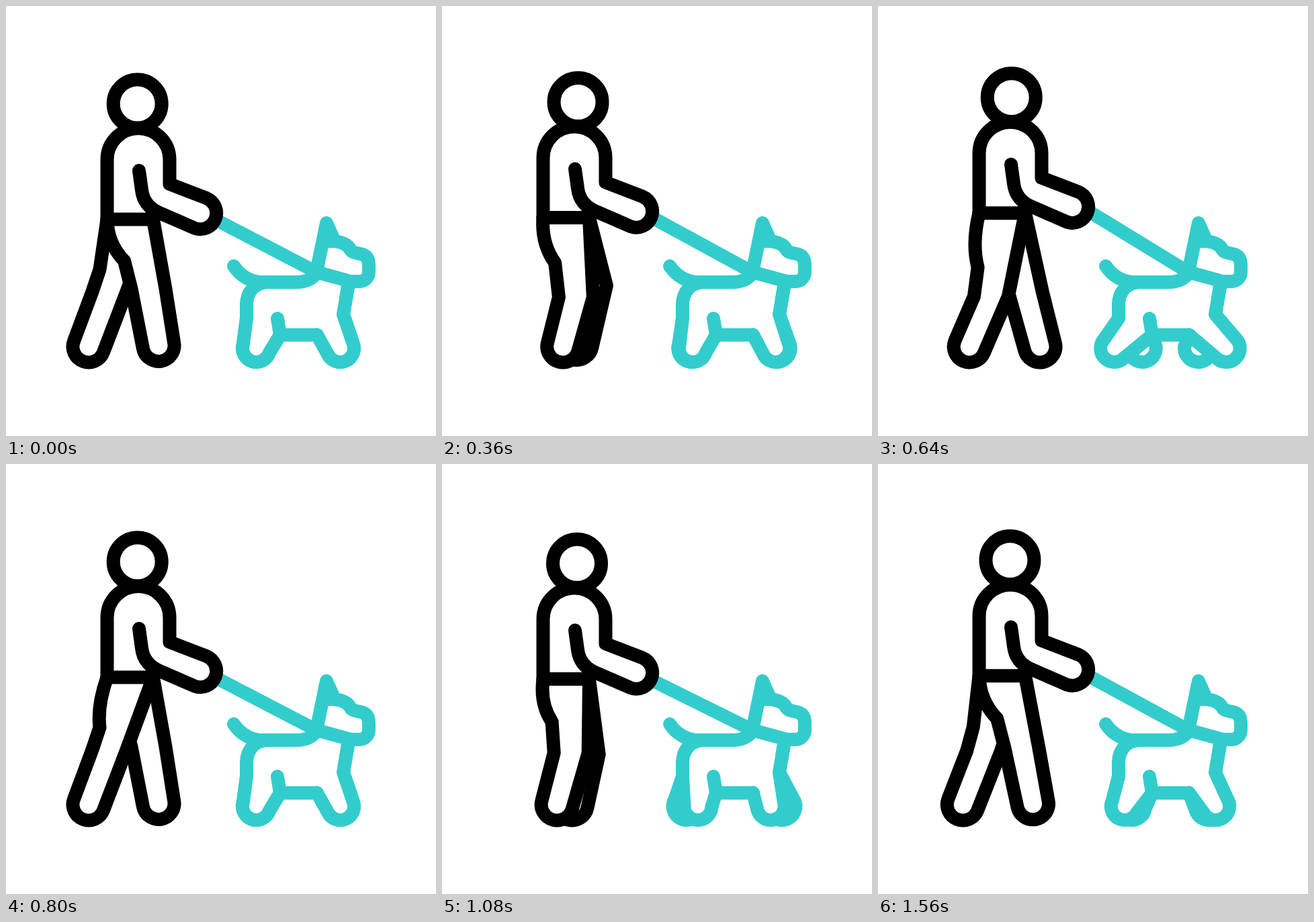
Animation, 640 px wide and 640 px high, one loop 1.6 s. Source, as an HTML page:

```html
<!DOCTYPE html>
<html lang="en">
<head>
<meta charset="utf-8">
<title>Dog walk</title>
<style>
  html, body { margin: 0; height: 100%; overflow: hidden; background: #fff; }
  svg { display: block; width: 100vw; height: 100vh; }
  path, circle { fill: none; stroke: #000; stroke-width: 20; stroke-linecap: round; stroke-linejoin: round; }
  .dog path, #leash { stroke: #3cc; }
  path.leg { fill: #fff; }
</style>
</head>
<body>
<svg viewBox="0 0 640 640">
  <path id="leash"/>
  <g class="dog">
    <path class="leg" id="hindFar"/>
    <path class="leg" id="foreFar"/>
    <path class="leg" id="hindNear"/>
    <path class="leg" id="foreNear"/>
    <path d="M339 387Q353 408 378 411H433Q452 411 462 398M390 411C370 411 358 426 358 445"/>
    <path d="M404 465L408 489.5H463"/>
    <path d="M477 323L489 350Q505 352 511 360Q514 366 519 367L530 369.5Q540 373 540 385V396A14 14 0 0 1 526 410H513L462 396L477 323M483 338L480 350H490"/>
  </g>
  <path class="leg" id="legFar"/>
  <path class="leg" id="legNear"/>
  <g id="torso">
    <path d="M219 317.5H150.5V228.500A46.500 46.500 0 0 1 243.500 228.500V265L298.700 286.200A24 24 0 0 1 281.300 330.900L231 309Q205 299 202 274L198 245"/>
    <circle id="head" cy="145.500" r="36"/>
  </g>
</svg>
<script>
const STEP = 40, BEAT = 200, HALF = 800;

const $ = id => document.getElementById(id);
const draw = (id, d) => $(id).setAttribute('d', d);

// One value per beat, joined linearly and looped
function track(values, t) {
  const n = values.length, p = t / BEAT % n, i = Math.floor(p);
  return values[i] + (values[(i + 1) % n] - values[i]) * (p - i);
}

// Shin outline: back of knee, round foot, front of knee
function shin(kx, ky, rx, ry, x, y, r) {
  const dx = x - (kx + rx) / 2, dy = y - (ky + ry) / 2, s = r / Math.hypot(dx, dy);
  const px = dy * s, py = dx * s;
  return `${kx} ${ky}L${x - px} ${y + py}A${r} ${r} 0 0 0 ${x + px} ${y - py}L${rx} ${ry}`;
}

// Knee and foot lead; the back of the thigh follows the knee
function personLeg(id, t, bob, curved) {
  const hip = 317.5 + bob;
  const kneeX = track([212, 217, 195, 172, 154, 165, 233, 221], t);
  const kneeY = track([421, 431, 434, 434, 425, 444, 409, 426], t);
  const footX = track([227, 207, 173, 139.5, 123, 142, 215, 244.5], t);
  const footY = 507 - 0.4 * Math.max(0, 425 - kneeY);
  const thighX = 42.5 + 0.63 * kneeX, thighY = 426 - 0.22 * kneeX;
  const bend = curved ? `Q${77 + 0.42 * thighX} ${(hip + thighY) / 2 + 5} ` : 'L';
  const lower = shin(kneeX - 25.5, kneeY, kneeX + 25.5, kneeY, footX, footY, 23.5);
  draw(id, `M150.5 ${hip}${bend}${thighX} ${thighY}L${lower}L219 ${hip}`);
}

// Hind and fore paws swing in opposite directions
function dogLegs(side, swing) {
  draw('hind' + side, `M358 445L${shin(358, 465, 408, 489.5, 372.5 - swing, 509.5, 20.5)}`);
  draw('fore' + side, `M${shin(463, 489.5, 502, 459, 497.5 + swing, 509.5, 20.5)}L510 412`);
}

function render(now) {
  const t = Math.floor(now / STEP) * STEP;
  const bob = track([0, 7.5, -5, -11.7], t);
  const swing = track([0, -16, 3, 26], t);
  $('torso').setAttribute('transform', `translate(0 ${bob})`);
  $('head').setAttribute('cx', track([195.7, 199.5, 203.3, 199.5], t));
  draw('leash', `M312 ${318 + 1.45 * bob}L460 395`);
  personLeg('legFar', t + HALF, bob, false);
  personLeg('legNear', t, bob, true);
  dogLegs('Far', -swing);
  dogLegs('Near', swing);
}

const start = performance.now();
function tick() {
  render(performance.now() - start);
  requestAnimationFrame(tick);
}
tick();
</script>
</body>
</html>
```
